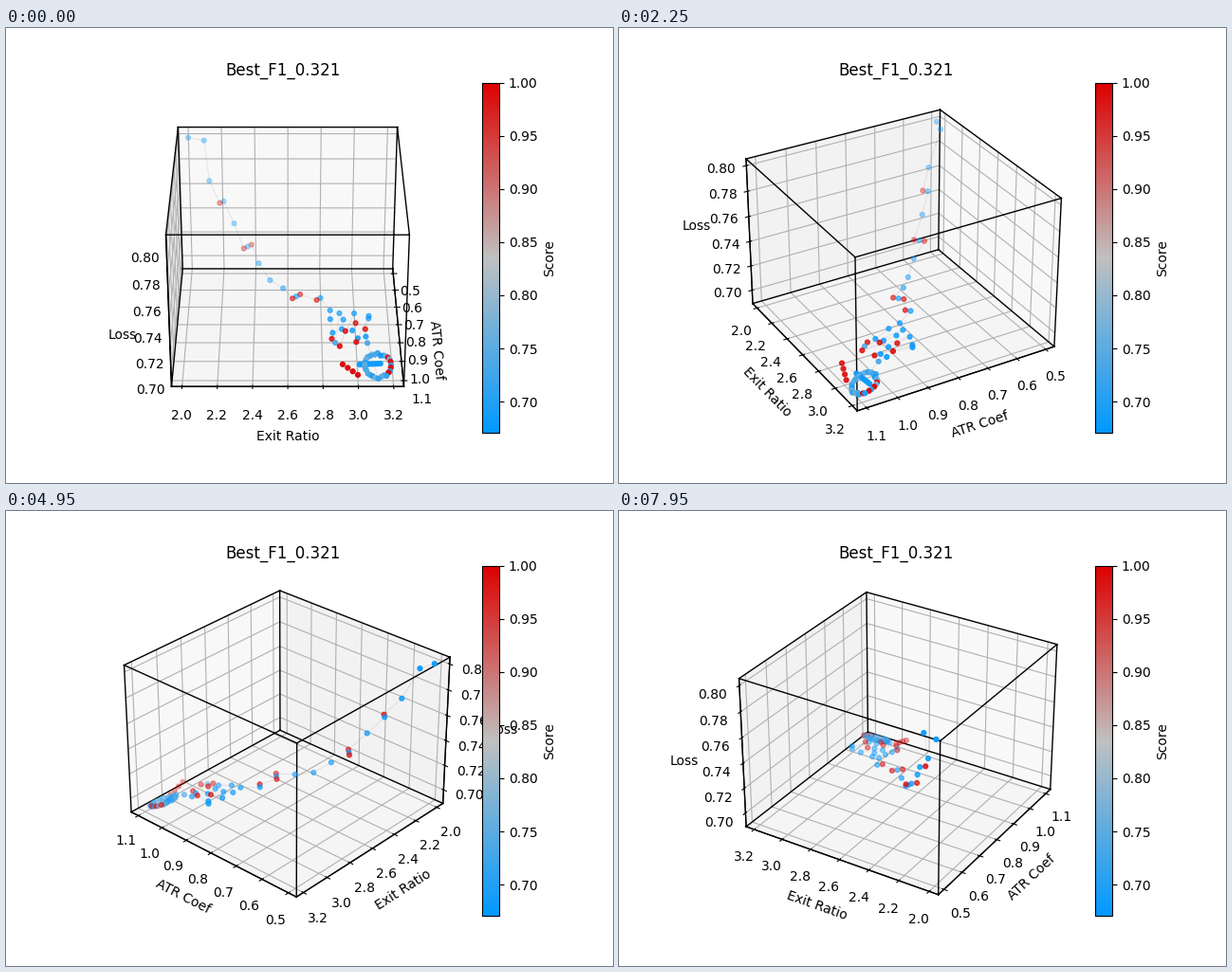
Write a matplotlib script that moves like this. It is 640 px wide and 480 px high and loops after 8 s.

```python
import itertools

import matplotlib.pyplot as plt
import numpy as np
from matplotlib.animation import FuncAnimation
from matplotlib.colors import LinearSegmentedColormap

STEP_MS, TICK_MS, LOOP_MS = 150, 50, 8000
DEG_PER_STEP = 4
LIMITS = (0.47, 1.13), (1.94, 3.258), (0.6888, 0.8052)
BLUE, RED = 0.68, 0.99

# Descent path: ATR coefficient, exit ratio, loss.
PATH = np.array([
    (0.501, 2.002, 0.8005), (0.516, 2.098, 0.8001), (0.566, 2.129, 0.7742),
    (0.632, 2.278, 0.7483), (0.666, 2.359, 0.7341), (0.744, 2.494, 0.7174),
    (0.822, 2.650, 0.7152), (0.828, 2.781, 0.7140),
])


def with_score(xyz, score):
    xyz = np.atleast_2d(xyz)
    return np.column_stack([xyz, np.broadcast_to(score, len(xyz))])


def descent():
    """Single blue stops, with red-blue fans at some places on the path."""
    fans = {2.5: 2, 4: 3, 6: 3, 7: 2}
    spread = np.array([-0.0115, 0.0225, 0])
    stops = sorted([*range(len(PATH)), 2.5, 4.5, 5.5])
    parts = []
    for t in stops:
        spot = [np.interp(t, range(len(PATH)), column) for column in PATH.T]
        n = fans.get(t, 1)
        for k in range(n):
            score = RED if n > 1 and k % 2 == 0 else BLUE
            parts.append(with_score(spot + (k - (n - 1) / 2) * spread, score))
    return np.vstack(parts)


def shelf(rng):
    """Jittered lattice on a slope that falls as the coefficient grows."""
    atr, ratio = np.meshgrid(np.linspace(0.88, 1.012, 5),
                             np.linspace(2.855, 3.06, 4))
    atr = atr.ravel() + rng.normal(0, 0.008, atr.size)
    ratio = ratio.ravel() + rng.normal(0, 0.012, ratio.size)
    loss = 0.7105 - 0.05 * (atr - 0.88) + rng.normal(0, 0.001, atr.size)
    score = rng.choice([BLUE, BLUE, 0.73, RED], atr.size)
    return with_score(np.column_stack([atr, ratio, loss]), score)


def knot(rng):
    """A tilted ring with a red right side, a blue bar and a red tail."""
    angle = np.linspace(0, 2 * np.pi, 28, endpoint=False)
    atr = 1.067 + 0.035 * np.cos(angle) + rng.normal(0, 0.002, angle.size)
    ratio = 3.115 + 0.075 * np.sin(angle)
    loss = 0.696 - 0.115 * (atr - 1.066)
    reds = (np.sin(angle) > 0.7) & (np.arange(angle.size) % 2 == 0)
    score = np.where(reds, RED, rng.uniform(BLUE, 0.78, angle.size))
    ring = with_score(np.column_stack([atr, ratio, loss]), score)
    bar = np.linspace((1.064, 3.01, 0.6962), (1.055, 3.13, 0.6955), 8)
    tail = np.linspace((1.084, 2.912, 0.6994), (1.094, 2.999, 0.6925), 4)
    return np.vstack([ring, with_score(bar, BLUE), with_score(tail, RED)])


def box_outline(limits):
    """All twelve edges as one path, broken by NaN rows."""
    rows = []
    for a, b in itertools.combinations(itertools.product(*limits), 2):
        if sum(p != q for p, q in zip(a, b)) == 1:
            rows += [a, b, (np.nan,) * 3]
    return np.array(rows).T


rng = np.random.default_rng(4)
atr, ratio, loss, score = np.vstack([descent(), shelf(rng), knot(rng)]).T
cmap = LinearSegmentedColormap.from_list(
    "score", ["#0099ff", "#c0c0c0", "#dd0000"])

fig = plt.figure(figsize=(6.4, 4.8), dpi=100)
ax = fig.add_subplot(projection="3d")
ax.plot(atr, ratio, loss, color="gray", alpha=0.15, lw=0.8)
dots = ax.scatter(atr, ratio, loss, c=score, cmap=cmap, s=12,
                  vmin=0.6705, vmax=1.0)
ax.plot(*box_outline(LIMITS), color="black", lw=1)

ax.set(xlabel="ATR Coef", ylabel="Exit Ratio", zlabel="Loss",
       title="Best_F1_0.321",
       xticks=np.linspace(0.5, 1.1, 7),
       yticks=np.linspace(2.0, 3.2, 7),
       zticks=np.linspace(0.70, 0.80, 6))
ax.set(xlim=LIMITS[0], ylim=LIMITS[1], zlim=LIMITS[2])
fig.colorbar(dots, ax=ax, label="Score")


def update(i):
    step = i * TICK_MS // STEP_MS
    # The tiny offset keeps the axes on the same side when seen head-on.
    ax.view_init(elev=30, azim=DEG_PER_STEP * step + 0.01)
    return ()


anim = FuncAnimation(fig, update, frames=LOOP_MS // TICK_MS,
                     interval=TICK_MS, repeat=True, repeat_delay=0)
plt.show()
```
